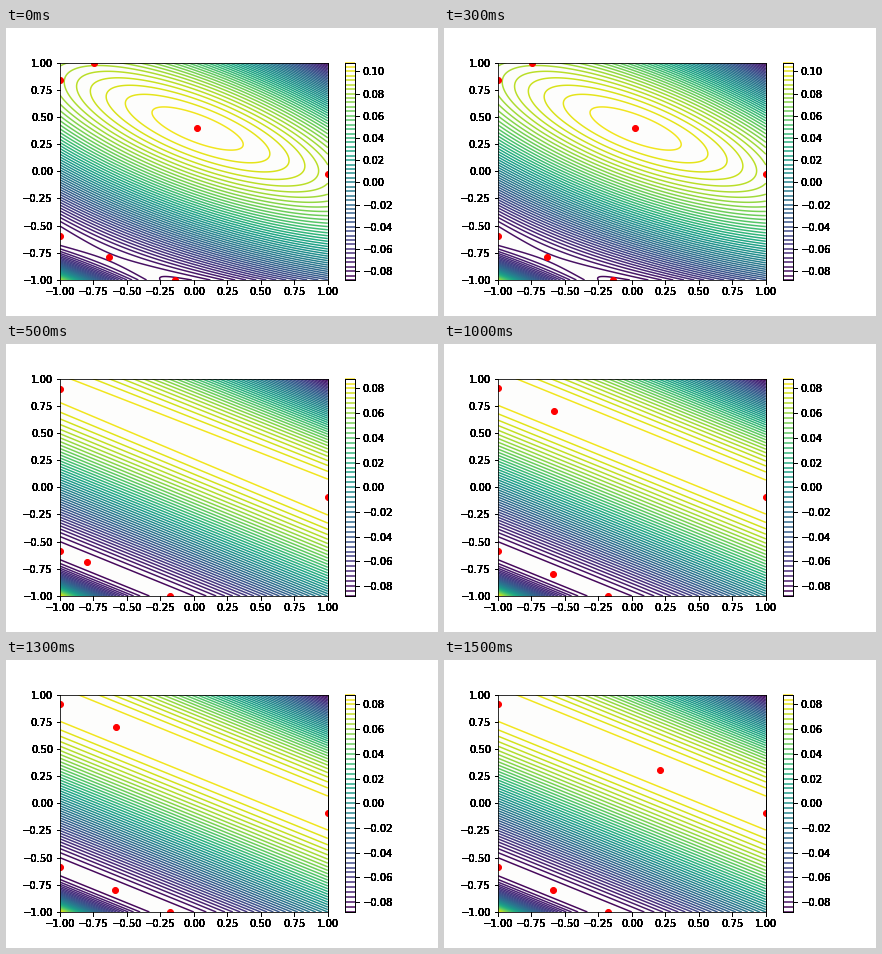
A matplotlib script that plays this animation: 432 by 288 pixels, repeating every 2000 ms.

```python
import numpy as np
import matplotlib.pyplot as plt
from matplotlib.animation import FuncAnimation

STEP = 0.004          # spacing of the contour levels
HALF_RANGE = 3        # x + 2y lies in [-3, 3] on the square
RIDGE, VALLEY = -1, 0  # index of a column's turning point, bottom to top

grid = np.linspace(-1, 1, 201)
fine = np.linspace(-1, 1, 2001)


def ridge_error(x, y):
    """Error of the best quadratic fit to 1 / (x + 2y + 4) on the square."""
    c = 4 / HALF_RANGE
    r = c - np.sqrt(c * c - 1)
    size = r**2 / (c * c - 1) / HALF_RANGE
    u = np.clip((x + 2 * y) / HALF_RANGE, -1, 1)
    z = u + 1j * np.sqrt(1 - u * u)
    return -size * np.real(z**2 * (z + r) / (1 + r * z))


def rough_fit(x, y):
    swell = (0.0182 - 0.0035 * x + 0.0071 * y
             - 0.016 * x * x + 0.0097 * x * y - 0.0108 * y * y)
    return ridge_error(x, y) + swell


def close_fit(x, y):
    tilt = 0.0002 * (x + 2 * y + 2.18) * (x - y / 2 - 0.42)
    return ridge_error(x, y) + tilt


def turning_points(values):
    rising = np.diff(values) > 0
    return fine[1:-1][rising[1:] != rising[:-1]]


def edge_extrema(f):
    for side in (-1, 1):
        yield from ((side, y) for y in turning_points(f(side, fine)))
        yield from ((x, side) for x in turning_points(f(fine, side)))


def column_extremum(f, x, kind):
    return x, turning_points(f(x, fine))[kind]


# Each stage: surface and the columns where an inner extremum is marked.
STAGES = [
    (rough_fit, {RIDGE: 0.023, VALLEY: -0.634}),
    (close_fit, {VALLEY: -0.8}),
    (ridge_error, {RIDGE: -0.58, VALLEY: -0.59}),
    (ridge_error, {RIDGE: 0.212, VALLEY: -0.59}),
]


def harden(artist, times=12):
    """Draw the artist repeatedly so its soft edges turn solid."""
    draw_once = artist.draw

    def draw_many(renderer):
        for _ in range(times):
            draw_once(renderer)

    artist.draw = draw_many


fig = plt.figure(figsize=(6, 4), dpi=72)
fig.subplots_adjust(left=0.125, right=0.9, bottom=0.125, top=0.88)


def draw(i):
    f, inner = STAGES[i % len(STAGES)]
    fig.clear()
    ax = fig.add_subplot(facecolor="#fdfdfc")

    z = f(*np.meshgrid(grid, grid))
    low, high = np.floor(z.min() / STEP), np.ceil(z.max() / STEP)
    levels = np.arange(low, high + 1) * STEP
    bar = fig.colorbar(ax.contour(grid, grid, z, levels=levels), ax=ax)

    points = list(edge_extrema(f))
    points += [column_extremum(f, x, kind) for kind, x in inner.items()]
    ax.plot(*zip(*points), "ro")
    ax.set(xlim=(-1, 1), ylim=(-1, 1))

    for part in (ax.xaxis, ax.yaxis, ax.spines["right"],
                 bar.ax.yaxis, bar.outline):
        harden(part)
    return []


anim = FuncAnimation(fig, draw, frames=len(STAGES), interval=500, repeat=True)
plt.show()
```
